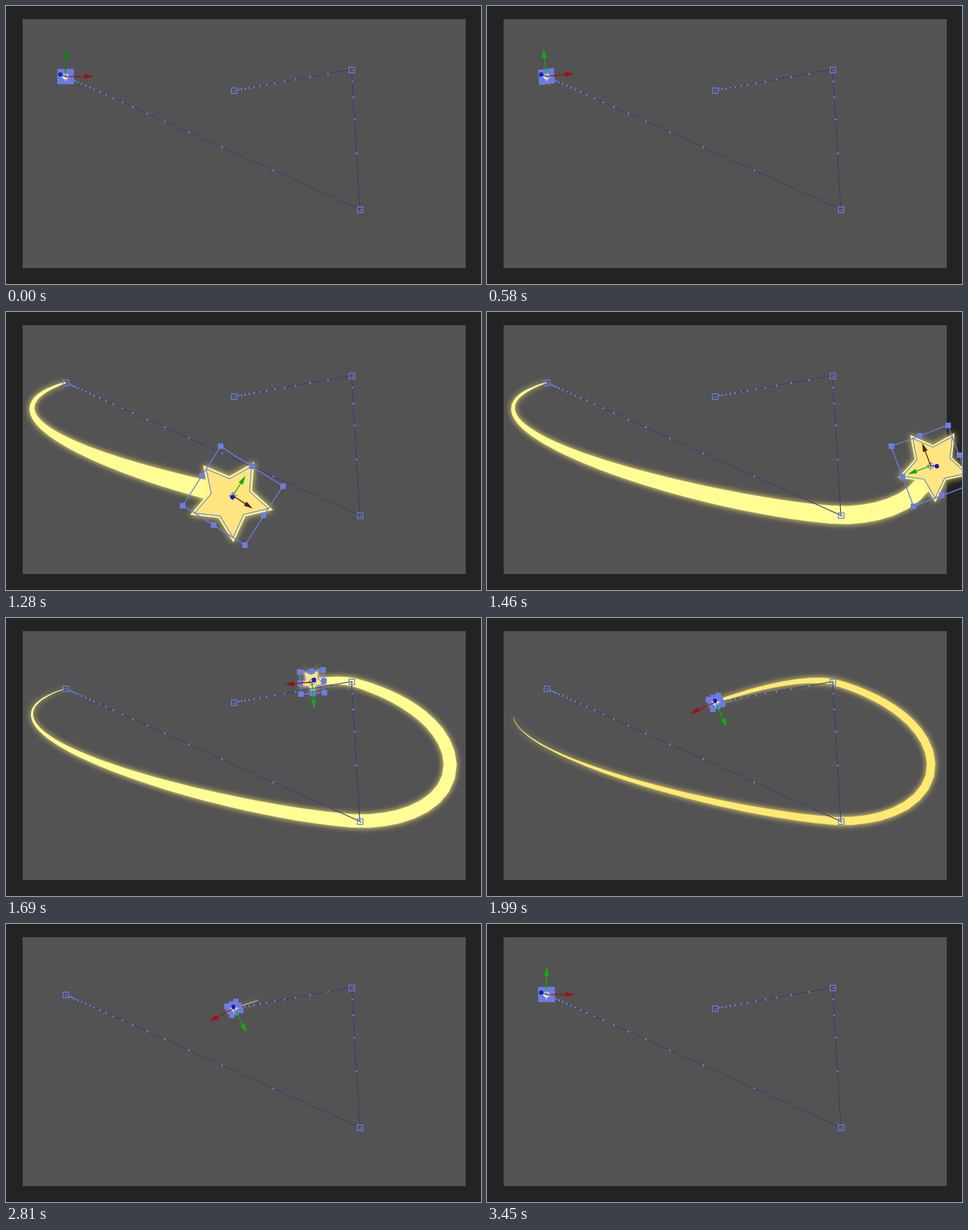
Write an HTML page with a canvas that moves like this. It is 686 px wide and 402 px high and loops after 3.5 s.

```html
<!DOCTYPE html>
<html lang="en">
<head>
<meta charset="utf-8">
<style>
html, body { margin: 0; width: 100%; height: 100%; overflow: hidden; background: #232323; }
canvas { display: block; }
</style>
</head>
<body>
<canvas width="686" height="402"></canvas>
<script>
const LOOP = 3500, START = 580, KEY = 1366, END = 2004, RESET = 3450;
const STEP = 46.2, LIFE = 980;
const BLUE = '#6b7de0';
const g = document.querySelector('canvas').getContext('2d');

const makePath = d => {
  const p = document.createElementNS('http://www.w3.org/2000/svg', 'path');
  p.setAttribute('d', d);
  return p;
};
const first = 'M86 102C-108 165 330 284 511 294';
const track = makePath(first + 'C682 292 692 146 499 92C454 85 388 101 329 122');
const firstLen = makePath(first).getTotalLength();
const total = track.getTotalLength();
const at = d => track.getPointAtLength(Math.max(0, Math.min(total, d)));

// Pose of the star as functions of time
const travel = t => t <= START ? 0
  : t < KEY ? firstLen * ((t - START) / (KEY - START)) ** 3.28
  : total - (total - firstLen) * (Math.max(0, END - t) / (END - KEY)) ** 2.13;
const bell = t => Math.exp(-(((t - 1333) / 202) ** 2) / 2);
const size = t => 15 + 95 * bell(t);
const spin = t => -568 / (1 + Math.exp(-0.00685 * (t - 1233))) * Math.PI / 180;

const keys = [[86, 102], [511, 294], [499, 92], [329, 122]];
const ticks = [
  [91, 94, 97, 100, 104, 109, 115, 121, 127, 135, 144, 155, 168, 183, 204, 229, 264, 312, 386]
    .map(x => (x - 86) / 425),
  [213, 164, 132, 109].map(y => (294 - y) / 202),
  [465, 439, 418, 402, 388, 376, 367, 358, 351, 345, 340, 336].map(x => (499 - x) / 170)
];

function line(pts, color, width, close) {
  g.beginPath();
  pts.forEach(p => g.lineTo(p[0], p[1]));
  if (close) g.closePath();
  g.strokeStyle = color;
  g.lineWidth = width;
  g.stroke();
}

function fill(pts, color) {
  g.beginPath();
  pts.forEach(p => g.lineTo(p[0], p[1]));
  g.closePath();
  g.fillStyle = color;
  g.fill();
}

function square(x, y, s, color) {
  g.fillStyle = color;
  g.fillRect(Math.round(x - s / 2), Math.round(y - s / 2), s, s);
}

function disc(x, y, r, color) {
  g.beginPath();
  g.arc(x, y, r, 0, 7);
  g.fillStyle = color;
  g.fill();
}

function glow(blur) {
  g.shadowColor = '#ffe97a';
  g.shadowBlur = blur;
}

function trail(t) {
  const left = [], right = [];
  const add = born => {
    const d = travel(born), p = at(d), a = at(d - 0.5), b = at(d + 0.5);
    const len = Math.hypot(b.x - a.x, b.y - a.y) || 1;
    const w = 0.3 + 0.13 * size(born) * (1 - (t - born) / LIFE);
    const nx = -(b.y - a.y) / len * w, ny = (b.x - a.x) / len * w;
    left.push([p.x + nx, p.y + ny]);
    right.unshift([p.x - nx, p.y - ny]);
  };
  const stop = Math.min(t, END);
  for (let born = Math.max(START, t - LIFE); born < stop; born += 12) add(born);
  if (!left.length) return;
  add(stop);
  const warm = Math.min(1, bell(t) * 5);
  glow(8);
  fill([...left, ...right], `hsl(${51 + 8 * warm},100%,${72 + 7 * warm}%)`);
  g.shadowBlur = 0;
}

function guides() {
  line(keys, '#3a4072', 1.2);
  g.fillStyle = '#6b83e6';
  ticks.forEach((list, i) => {
    const [x, y] = keys[i], [u, v] = keys[i + 1];
    list.forEach(f => g.fillRect(x + (u - x) * f - 1, y + (v - y) * f - 1, 2.4, 2.4));
  });
  for (const [x, y] of keys) {
    g.strokeStyle = BLUE;
    g.lineWidth = 1.3;
    g.strokeRect(x - 3.5, y - 3.5, 8, 8);
    square(x + 0.5, y + 0.5, 2, BLUE);
  }
}

function arrow(x, y, angle, len, color) {
  const c = Math.cos(angle), s = Math.sin(angle);
  const p = (a, b) => [x + c * a - s * b, y + s * a + c * b];
  line([p(0, 0), p(len - 13, 0)], color, 1.3);
  fill([p(len, 0), p(len - 13, 3.5), p(len - 13, -3.5)], color);
}

function draw(now) {
  const time = now % LOOP;
  const idle = time < START || time >= RESET;
  const t = idle ? START : START + 5 + STEP * Math.floor((time - START + 0.5) / STEP);
  const { x, y } = at(travel(t));
  const w = size(t), big = bell(t), rot = idle ? 0 : spin(t);
  const c = Math.cos(rot), s = Math.sin(rot);
  const local = ([a, b]) => [x + c * a - s * b, y + s * a + c * b];

  g.fillStyle = '#232323';
  g.fillRect(0, 0, 686, 402);
  g.fillStyle = '#535353';
  g.fillRect(24, 19, 640, 360);

  if (!idle) trail(t);

  const R = w * 0.526;
  const star = Array.from({ length: 10 }, (_, i) => {
    const r = i % 2 ? R * 0.52 : R, a = (i * 36 - 90) * Math.PI / 180;
    return local([r * Math.cos(a), r * Math.sin(a) + R * 0.096]);
  });
  g.miterLimit = 10;
  glow(10);
  line(star, '#fffa88', w * 0.062, true);
  g.shadowBlur = 0;
  fill(star, '#ffe57f');

  guides();
  line(star, BLUE, 1.2, true);

  // Transform box, clockwise from the top left, with handles
  const h = w * 0.475, k = w / 2;
  const box = [[-k, -h], [0, -h], [k, -h], [k, 0], [k, h], [0, h], [-k, h], [-k, 0]].map(local);
  line(box, BLUE, 1.4, true);
  box.forEach(p => square(p[0], p[1], 8, BLUE));

  const mark = big < 0.1 ? '#e8ebff' : BLUE;
  line([[x - 6, y], [x + 7, y]], mark, 1);
  line([[x, y - 6], [x, y + 7]], mark, 1);
  g.beginPath();
  g.arc(x, y, 4, 0, 7);
  g.stroke();

  const dim = time < START, len = 40 - 6 * big;
  arrow(x, y, rot, len, dim ? '#971414' : `rgb(${170 - 90 * big},${12 + 15 * big},12)`);
  arrow(x, y, rot - Math.PI / 2, len, dim ? '#0b800b' : '#0fb00f');
  const bx = x + (x - 344) * 0.03, by = y + (y - 199) * 0.03;
  line([[x, y], [bx, by]], '#1c1ca8', 1.2);
  disc(bx, by, 3.2, dim ? '#2525a0' : '#1c1cb4');
}

const begin = performance.now();
function frame() {
  draw(performance.now() - begin);
  requestAnimationFrame(frame);
}
frame();
</script>
</body>
</html>
```
